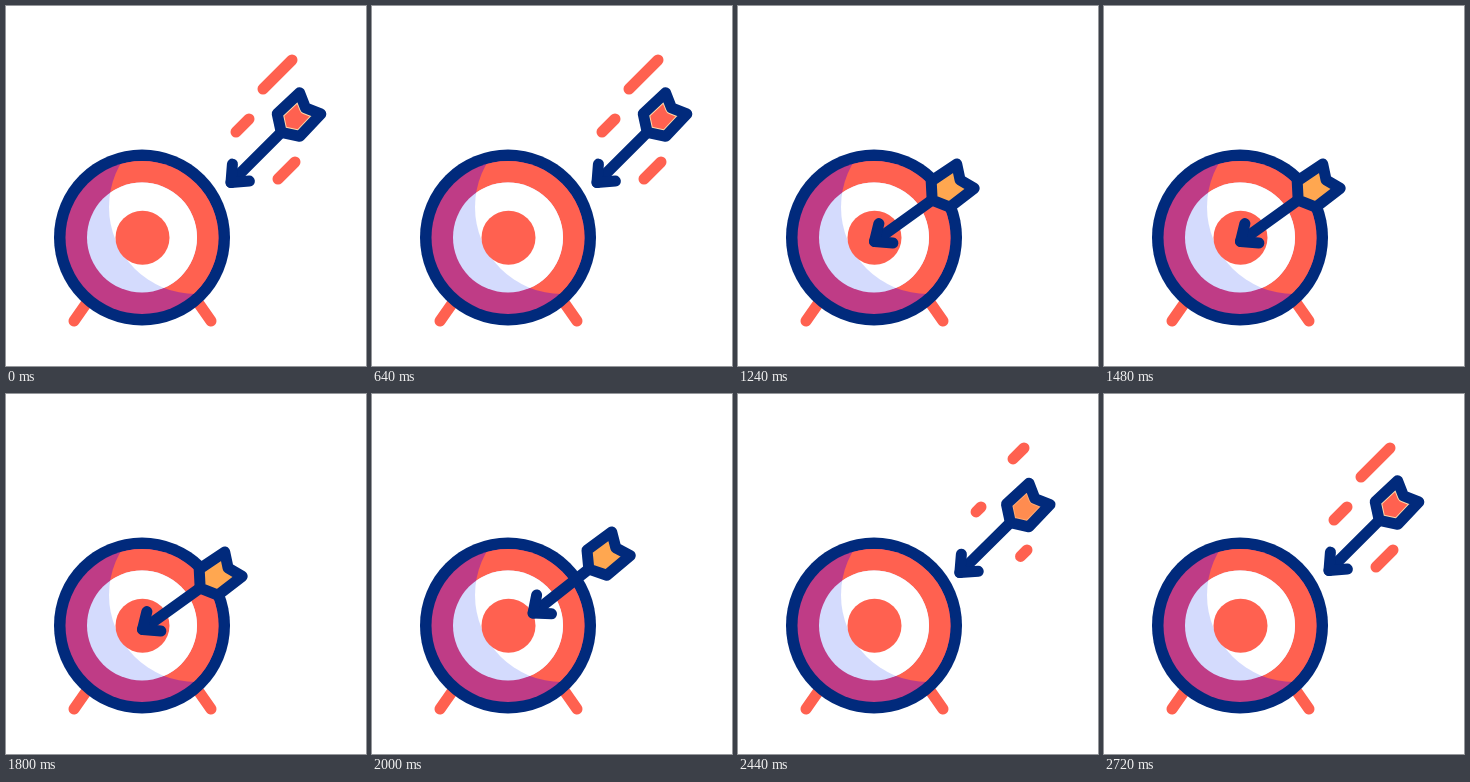
Write an HTML page with a canvas that moves like this. It is 360 px wide and 360 px high and loops after 2760 ms.

```html
<!DOCTYPE html>
<html lang="en">
<head>
<meta charset="utf-8">
<title>Arrow and target</title>
<style>
  html, body { margin: 0; width: 100%; height: 100%; overflow: hidden; background: #fff; }
  canvas { display: block; width: 360px; height: 360px; }
</style>
</head>
<body>
<canvas id="stage"></canvas>
<script>
const LOOP = 2760;
const NAVY = '#012a7c', RED = '#ff6150', ORANGE = '#ffa750', CREAM = '#ffd9a8';
const PURPLE = '#bf3c86', LAVENDER = '#d4dbfd', WHITE = '#fff';
const STROKE = 11;

const canvas = document.getElementById('stage');
const ctx = canvas.getContext('2d');
const ratio = window.devicePixelRatio || 1;
canvas.width = canvas.height = 360 * ratio;

const clamp = x => Math.min(1, Math.max(0, x));
const span = (t, from, to) => clamp((t - from) / (to - from));
const mix = (a, b, k) => a + (b - a) * k;

// Cubic bezier easing with control points (x1, 0) and (x2, 1).
function bezier(x, x1, x2) {
  let lo = 0, hi = 1;
  for (let i = 0; i < 24; i++) {
    const s = (lo + hi) / 2, r = 1 - s;
    if (3 * r * r * s * x1 + 3 * r * s * s * x2 + s * s * s < x) lo = s; else hi = s;
  }
  return lo * lo * (3 - 2 * lo);
}

// 0 = waiting in the air, 1 = stuck in the bullseye.
function flight(t) {
  if (t < 1500) return span(t, 690, 1225) ** 2.2;
  return 1 - bezier(span(t, 1823, 2663), 0.33, 0.1);
}

function trails(t) {
  return t < 1500 ? 1 - span(t, 660, 880) : span(t, 2320, 2640);
}

function disc(x, y, r, color) {
  ctx.beginPath();
  ctx.arc(x, y, r, 0, Math.PI * 2);
  ctx.fillStyle = color;
  ctx.fill();
}

function line(points, color, width = STROKE) {
  ctx.beginPath();
  points.forEach(([x, y]) => ctx.lineTo(x, y));
  ctx.strokeStyle = color;
  ctx.lineWidth = width;
  ctx.stroke();
}

// A disc whose lower left part lies in shade.
function shadedDisc(r, color, shade) {
  disc(136, 231.5, r, shade);
  ctx.save();
  ctx.beginPath();
  ctx.arc(190, 201, 87, 0, Math.PI * 2);
  ctx.clip();
  disc(136, 231.5, r, color);
  ctx.restore();
}

function drawTarget() {
  line([[68, 315], [82, 295]], RED);
  line([[205, 315], [191, 295]], RED);
  disc(136, 231.5, 88, NAVY);
  shadedDisc(76.5, RED, PURPLE);
  shadedDisc(55, WHITE, LAVENDER);
  disc(136.5, 231.7, 27, RED);
}

function drawTrails(k) {
  if (k <= 0) return;
  const paths = [[286, 54, 257, 83], [243, 113, 230, 126], [289, 156, 272, 173]];
  for (const [x1, y1, x2, y2] of paths) {
    line([[x1, y1], [mix(x1, x2, k), mix(y1, y2, k)]], RED, STROKE * Math.min(1, k * 4));
  }
}

function drawArrow(p, glow) {
  ctx.save();
  ctx.translate(mix(225, 136.5, p), mix(176.5, 235.5, p));
  ctx.rotate(mix(-45, -35.7, p) * Math.PI / 180);
  line([[0, 0], [71, 0]], NAVY);
  line([[14, -12], [0, 0], [14, 12]], NAVY);

  const feather = new Path2D('M71 0 L81.3 -16 L112 -15 L105.4 0 L112 15 L81.3 16 Z');
  ctx.fillStyle = ORANGE;
  ctx.fill(feather);
  ctx.save();
  ctx.clip(feather);
  ctx.globalAlpha = glow;
  ctx.fillStyle = RED;
  ctx.fill(feather);
  ctx.strokeStyle = CREAM;
  ctx.lineWidth = STROKE + 2;
  ctx.stroke(feather);
  ctx.restore();
  ctx.strokeStyle = NAVY;
  ctx.lineWidth = STROKE;
  ctx.stroke(feather);
  ctx.restore();
}

function draw(now) {
  const t = now % LOOP;
  ctx.setTransform(ratio, 0, 0, ratio, 0, 0);
  ctx.fillStyle = WHITE;
  ctx.fillRect(0, 0, 360, 360);
  ctx.lineCap = ctx.lineJoin = 'round';
  const k = trails(t);
  drawTarget();
  drawTrails(k);
  drawArrow(flight(t), k);
}

const start = performance.now();
function tick() {
  draw(performance.now() - start);
  requestAnimationFrame(tick);
}
tick();
</script>
</body>
</html>
```
